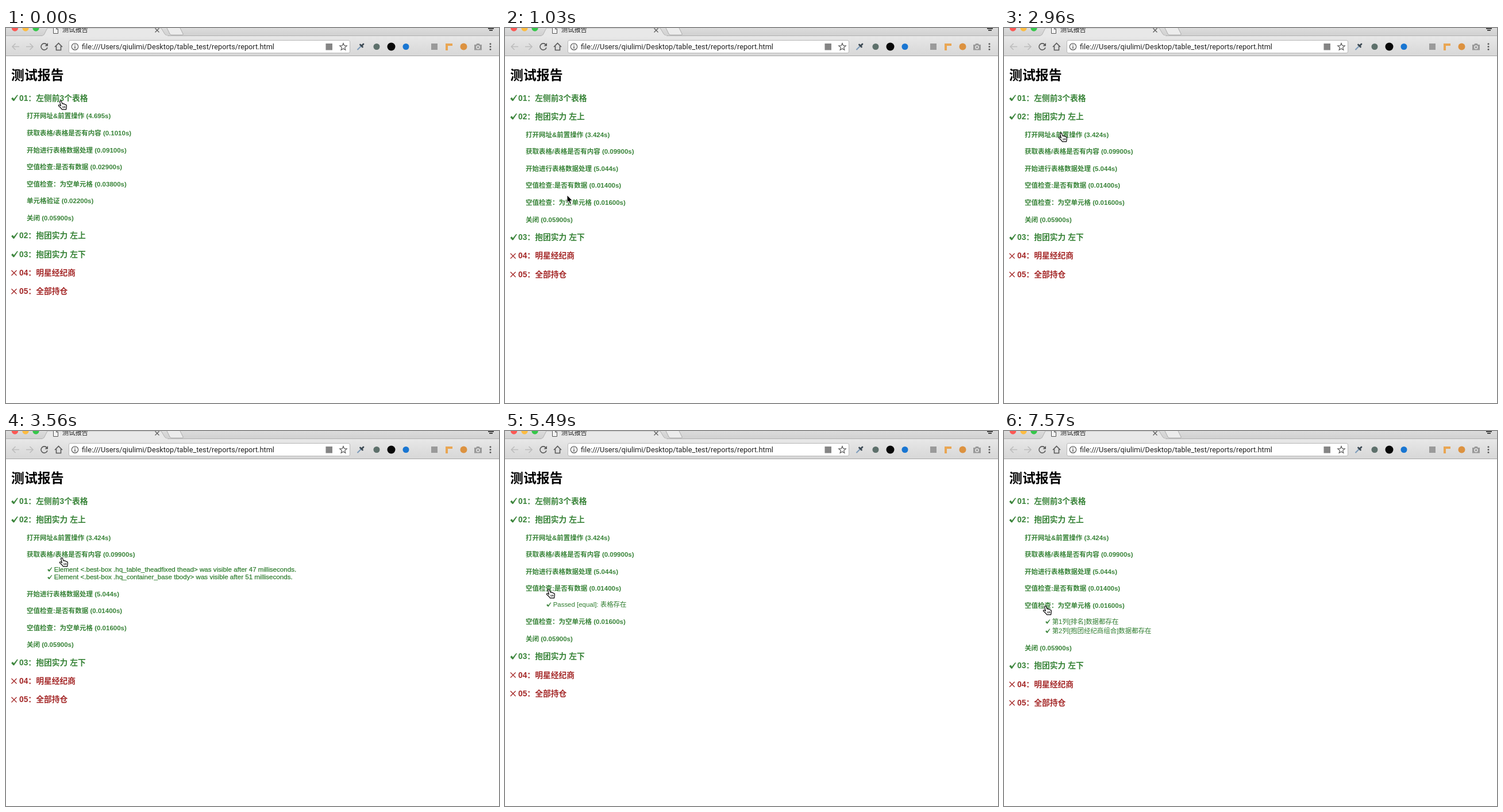
These frames come from a looping animation (858x653 px, 8000 ms). An HTML page:

```html
<!DOCTYPE html>
<html lang="zh-CN">
<head>
<meta charset="utf-8">
<title>测试报告</title>
<style>
html, body { margin: 0; width: 100%; height: 100%; overflow: hidden; background: #fff; }
svg { display: block; }
text { font-family: "Liberation Sans", "Noto Sans CJK SC", "Noto Sans CJK", sans-serif; white-space: pre; }
.title { font-size: 22.9px; font-weight: bold; }
.case { font-size: 13.8px; font-weight: bold; }
.step { font-size: 11.5px; font-weight: bold; }
.en { font-size: 11.6px; stroke: #2f7d2f; stroke-width: .25; }
.zh { font-size: 11.45px; }
.url { font: 12.72px Roboto, sans-serif; }
.line { fill: none; stroke: #5a5a5a; stroke-width: 1.6; }
.thin { stroke-width: 1.2; }
.off { stroke: #bdbdbd; }
</style>
</head>
<body>
<svg width="858" height="653" viewBox="0 0 858 653">
  <defs>
    <linearGradient id="strip" x2="0" y2="1"><stop stop-color="#dcdcdc"/><stop offset="1" stop-color="#d0d0d0"/></linearGradient>
    <linearGradient id="bar" x2="0" y2="1"><stop stop-color="#e8e8e8"/><stop offset="1" stop-color="#d7d7d7"/></linearGradient>
  </defs>

  <!-- Tab strip -->
  <rect width="858" height="14" fill="url(#strip)"/>
  <rect y="13" width="858" height="36" fill="url(#bar)"/>
  <path d="M0 13.5H63Q66 13 67 10L72 0H270L276 10Q278 13 281 13.5H858" fill="#e8e8e8" stroke="#b0b0b0"/>
  <path d="M64 14H281" stroke="#e8e8e8" stroke-width="2"/>
  <path d="M280 0L285 10Q286 12 288 12H307Q309 12 308 10L303 0" fill="#ececec" stroke="#aaa"/>
  <circle cx="15.5" r="5.7" fill="#fc5753"/>
  <circle cx="34" r="5.7" fill="#fdbc40"/>
  <circle cx="52" r="5.7" fill="#34c749"/>
  <path d="M82.5-1V9.5H90.5V2L87.5-1M87.5-1V2H90.5" fill="#f4f4f4" stroke="#555"/>
  <text x="98" y="7.3" font-size="11.2" fill="#222">测试报告</text>
  <path class="line thin" d="M259.5.5l7 7m0-7l-7 7"/>
  <path d="M839 0H849V2H839ZM841 3H847V5H841Z" fill="#444"/>

  <!-- Toolbar -->
  <path d="M0 48.5H858" stroke="#a6a6a6"/>
  <path class="line off" d="M23 32.5H11m5.5-5.5L11 32.5 16.5 38M35 32.5H47m-5.5-5.5L47 32.5 41.5 38"/>
  <path class="line" d="M71 29A5.6 5.6 0 1 0 72 34"/>
  <path d="M73 26V31.5H67.5Z" fill="#5a5a5a"/>
  <path class="line" d="M85 33L91.5 26.5 98 33M87.5 31.5V38.5H95.5V31.5"/>
  <rect x="109.5" y="21.5" width="489" height="22" rx="2.5" fill="#fff" stroke="#b8b8b8"/>
  <circle class="line thin" cx="120" cy="32.5" r="5.7"/>
  <path d="M120 31.5V36M120 28.8V30.3" stroke="#555" stroke-width="1.5"/>
  <text class="url" x="132" y="37" fill="#222">file:///Users/qiulimi/Desktop/table_test/reports/report.html</text>
  <rect x="556.5" y="27" width="11.5" height="11.5" fill="#858585"/>
  <path class="line thin" d="M587 26.5l1.7 4.2 4.5.3-3.5 2.9 1.1 4.4-3.8-2.4-3.8 2.4 1.1-4.4-3.5-2.9 4.5-.3z"/>

  <!-- Extensions -->
  <path d="M611.5 38L618 31.5" stroke="#7d9cba" stroke-width="2.2"/>
  <path d="M616.5 29L620.5 33M619.5 30.5L622 28" stroke="#3d4a54" stroke-width="2.8" stroke-linecap="round"/>
  <circle cx="645" cy="32.5" r="5.5" fill="#5d706b"/>
  <circle cx="670.5" cy="32.5" r="7" fill="#080808"/>
  <circle cx="696" cy="32.5" r="5.5" fill="#1976d2"/>
  <rect x="740" y="27" width="11" height="11" fill="#9a9a9a"/>
  <path d="M765 27H777V31H769V39H765Z" fill="#e9a653"/>
  <circle cx="796.5" cy="32.5" r="6" fill="#dc9240"/>
  <path d="M815 29H818L819.5 27H823.5L825 29H828V38.5H815Z" fill="#999"/>
  <circle cx="821.5" cy="33.5" r="2.6" fill="#999" stroke="#eee" stroke-width="1.3"/>
  <path d="M843 27.8v0m0 4.7v0m0 4.7v0" stroke="#5a5a5a" stroke-width="3" stroke-linecap="round"/>

  <!-- Page -->
  <text class="title" x="9" y="89.7">测试报告</text>
  <g id="report"></g>
  <g id="cursor">
    <g id="hand" stroke="#000" stroke-linejoin="round">
      <path fill="#fff" stroke-width="1.2" d="M-1.5 1.2C-1.2-.6 1-.6 1.6 1L3 5C4 4.2 5.2 4.6 5.6 5.6C6.8 5 7.8 5.6 8.2 6.6C9.4 6.2 10.2 7 10.3 8.2C10.6 10.5 10 12 9.6 14.8H2.4C1.5 12.5-1.5 10.5-3.4 8.6C-4.2 7.2-2.4 6.3-1 7.4L.4 8.6Z"/>
      <path fill="none" d="M3.5 9.5l.8 3M5.6 9.2l.7 3M7.6 9l.4 3" stroke-width=".9"/>
    </g>
    <path id="arrow" d="M0 0V13.5L3 10.7 5.1 15.8 7.5 14.8 5.4 9.8H9.5Z" fill="#000" stroke="#fff"/>
  </g>
</svg>
<script>
const TICK = 148.4, LOOP = 8000, GREEN = '#398439', DETAIL = '#2f7d2f', RED = '#a52a2a';
const $ = id => document.getElementById(id);
const visible = (target, ms) => `Element <${target}> was visible after ${ms} milliseconds.`;

const cases = [
  { name: '左侧前3个表格', ok: true, steps: [
    ['打开网址&前置操作', '4.695'], ['获取表格/表格是否有内容', '0.1010'],
    ['开始进行表格数据处理', '0.09100'], ['空值检查:是否有数据', '0.02900'],
    ['空值检查：为空单元格', '0.03800'], ['单元格验证', '0.02200'], ['关闭', '0.05900']] },
  { name: '抱团实力 左上', ok: true, steps: [
    ['打开网址&前置操作', '3.424', visible('.best-box .hq_table_base', 32), visible('.best-box .hq_table', 28)],
    ['获取表格/表格是否有内容', '0.09900',
      visible('.best-box .hq_table_theadfixed thead', 47), visible('.best-box .hq_container_base tbody', 51)],
    ['开始进行表格数据处理', '5.044'],
    ['空值检查:是否有数据', '0.01400', 'Passed [equal]: 表格存在'],
    ['空值检查：为空单元格', '0.01600', '第1列[排名]数据都存在', '第2列[抱团经纪商组合]数据都存在'],
    ['关闭', '0.05900']] },
  { name: '抱团实力 左下', ok: true },
  { name: '明星经纪商' },
  { name: '全部持仓' }
];

// [tick, open case, open step]
const states = [[0, 0], [2, -1], [5, 1], [16, 1, 0], [19, 1], [24, 1, 1], [27, 1], [37, 1, 3], [42, 1], [51, 1, 4]];

// [tick, x, y] of the pointer tip
const path = [
  [0, 95, 127], [2, 95, 128], [4, 96, 152], [5, 96, 152], [7, 108, 291], [9, 108, 289],
  [12, 100, 172], [13, 98, 170], [15, 98, 182], [16, 99, 183], [20, 99, 183], [23, 97, 221],
  [25, 97, 221], [26, 96, 217], [29, 95, 217], [35, 76, 276], [42, 76, 276], [45, 82, 173],
  [46, 80, 176], [49, 71, 304], [50, 72, 305], [60, 72, 305]
];

const escape = s => s.replace(/&/g, '&amp;').replace(/</g, '&lt;').replace(/>/g, '&gt;');
const label = (cls, x, y, s, color = GREEN) =>
  `<text class="${cls}" x="${x}" y="${y}" fill="${color}">${escape(s)}</text>`;
const check = (x, y, scale, color = GREEN) =>
  `<path transform="translate(${x} ${y}) scale(${scale})" fill="${color}" stroke="${color}" stroke-width=".6"
    d="M0 1.2L2.2-.6 4.2 2.2 10-5 11-4.6 4.6 5H3.2Z"/>`;
const cross = (x, y) =>
  `<path d="M${x} ${y - 4.5}l9 9m0-9l-9 9" stroke="${RED}" stroke-width="1.4"/>`;

function layout(openCase, openStep) {
  let y = 121.7, svg = '';
  const rows = [];
  cases.forEach(({ name, ok, steps }, i) => {
    rows.push(y);
    svg += ok ? check(9.5, y, 1) : cross(9.5, y + .5);
    svg += label('case', 23, y + 5, `0${i + 1}：${name}`, ok ? GREEN : RED);
    if (i !== openCase) { y += 32.3; return; }
    y += 31.4;
    steps.forEach(([title, secs, ...lines], j) => {
      rows.push(y);
      svg += label('step', 36, y + 4.2, `${title} (${secs}s)`);
      if (j === openStep) {
        const english = lines[0].startsWith('Element');
        const height = english ? 13.4 : 16.2;
        lines.forEach((line, k) => {
          const mid = y + (english ? 26 : 28) + k * height;
          svg += check(72.5, mid, .68, DETAIL) + label(english ? 'en' : 'zh', 83.7, mid + 4, line, DETAIL);
        });
        y += 11.9 + lines.length * height;
      }
      y += 29.6;
    });
    y += 1.1;
  });
  return { svg, rows };
}

function pointer(n) {
  const i = path.findIndex(p => p[0] > n);
  const [t0, x0, y0] = path[i - 1], [t1, x1, y1] = path[i];
  const k = (n - t0) / (t1 - t0);
  return [Math.round(x0 + (x1 - x0) * k), Math.round(y0 + (y1 - y0) * k)];
}

const views = states.map(([, c, s]) => layout(c, s));
let shown;

function draw() {
  const n = Math.floor(performance.now() % LOOP / TICK + .15);
  const view = views[states.findLastIndex(s => s[0] <= n)];
  if (view !== shown) {
    $('report').innerHTML = view.svg;
    shown = view;
  }
  const [x, y] = pointer(n);
  const over = view.rows.some(row => Math.abs(row - y) < 9);
  $('cursor').setAttribute('transform', `translate(${x} ${y})`);
  $('hand').style.display = over ? '' : 'none';
  $('arrow').style.display = over ? 'none' : '';
  requestAnimationFrame(draw);
}
draw();
</script>
</body>
</html>
```
